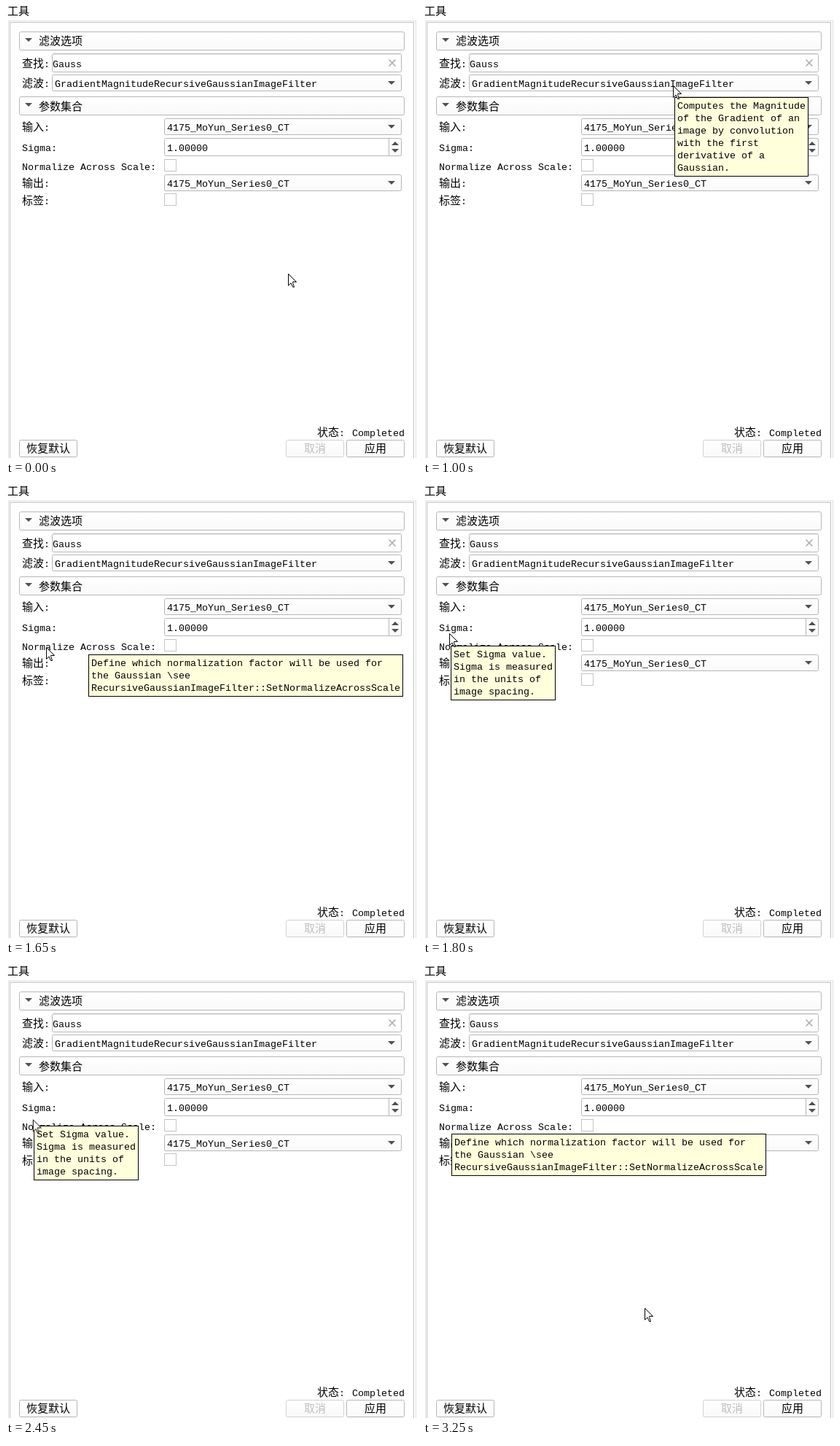
Write an HTML page that moves like this. It is 564 px wide and 620 px high and loops after 3.3 s.

```html
<!DOCTYPE html>
<html lang="zh-CN">
<head>
<meta charset="utf-8">
<title>工具</title>
<style>
  html, body { margin: 0; width: 100%; height: 100%; overflow: hidden; background: #fff; }
  svg { display: block; }
  text { font: 13.333px "Liberation Mono", "Noto Sans Mono", monospace; fill: #000; }
  .zh { font: 300 15px "Noto Sans CJK SC", "Noto Sans CJK", sans-serif; }
  .box { fill: #fff; stroke: #b6b6b6; }
  .face { fill: url(#face); stroke: #b6b6b6; }
  .off { stroke: #d2d2d2; }
  .check { fill: #fff; stroke: #c4c4c4; }
  .arrow { fill: #505050; }
  .dim { fill: #bebebe; }
  .paper { fill: #ffffdc; stroke: #000; }

  /* Start slightly early so each step has landed on its 50 ms tick. */
  .tip, #cursor { animation: 3300ms step-end -4ms infinite; }
  .tip { opacity: 0; }
  #tip1 { animation-name: tip1; }
  #tip2 { animation-name: tip2; }
  #tip3 { animation-name: tip3; }
  #tip4 { animation-name: tip4; }
  #cursor { animation-name: roam; }

  @keyframes tip1 { 0%, 48.4848% { opacity: 0; } 30.303% { opacity: 1; } }
  @keyframes tip2 { 0%, 53.0303% { opacity: 0; } 48.4848% { opacity: 1; } }
  @keyframes tip3 { 0%, 75.7576% { opacity: 0; } 53.0303% { opacity: 1; } }
  @keyframes tip4 { 0% { opacity: 0; } 75.7576%, 100% { opacity: 1; } }

  @keyframes roam {
    0%       { transform: translate(387px, 367px); animation-timing-function: steps(3, end); }
    4.5455%  { transform: translate(368px, 232px); animation-timing-function: steps(4, end); }
    10.6061% { transform: translate(347px, 112px); }
    15.1515% { transform: translate(345px, 110px); }
    16.6667% { transform: translate(343px, 109px); }
    43.9394% { transform: translate(343px, 109px); animation-timing-function: steps(3, end); }
    48.4848% { transform: translate(111px, 215px); }
    50%      { transform: translate(55px, 221px); animation-timing-function: steps(2, end); }
    53.0303% { transform: translate(36px, 203px); animation-timing-function: steps(2, end); }
    56.0606% { transform: translate(36px, 201px); }
    69.697%  { transform: translate(36px, 200px); animation-timing-function: steps(4, end); }
    75.7576% { transform: translate(37px, 214px); animation-timing-function: steps(2, end); }
    78.7879% { transform: translate(32px, 215px); }
    92.4242% { transform: translate(32px, 215px); animation-timing-function: steps(4, end); }
    98.4848%, 100% { transform: translate(304px, 469px); }
  }
</style>
</head>
<body>
<svg width="564" height="620" viewBox="0 0 564 620">
  <defs>
    <linearGradient id="face" x2="0" y2="1">
      <stop stop-color="#fff"/>
      <stop offset="1" stop-color="#f9f9f9"/>
    </linearGradient>
    <path id="down" class="arrow" d="M-5 -3H5L0 2Z"/>
    <g id="header">
      <rect class="face" x="18.5" y=".5" width="528" height="25" rx="2"/>
      <use href="#down" x="31" y="12"/>
    </g>
    <g id="combo">
      <rect class="face" x="217.5" y=".5" width="325" height="22" rx="2"/>
      <use href="#down" x="529" y="12"/>
      <text x="221" y="17">4175_MoYun_Series0_CT</text>
    </g>
    <rect id="check" class="check" x="217.5" y=".5" width="16" height="16"/>
    <g id="scaleTip">
      <rect class="paper" x=".5" y=".5" width="431" height="57"/>
      <text y="16">
        <tspan x="4">Define which normalization factor will be used for</tspan>
        <tspan x="4" dy="17">the Gaussian \see</tspan>
        <tspan x="4" dy="17">RecursiveGaussianImageFilter::SetNormalizeAcrossScale</tspan>
      </text>
    </g>
  </defs>

  <!-- Panel frame -->
  <text class="zh" x="2" y="12">工具</text>
  <rect x="3.5" y="20.5" width="559" height="620" fill="none" stroke="#dedede"/>
  <rect x="5.5" y="22.5" width="554" height="620" fill="none" stroke="#c2c2c2"/>

  <!-- Filter options -->
  <use href="#header" y="35"/>
  <text class="zh" x="45" y="53">滤波选项</text>
  <text x="22" y="84"><tspan class="zh">查找</tspan>:</text>
  <rect class="box" x="63.5" y="65.5" width="479" height="25" rx="2"/>
  <path d="M65 66.5H541" stroke="#e6e6e6"/>
  <text x="64" y="84">Gauss</text>
  <path d="M525.5 73.5l9 9m0 -9l-9 9" stroke="#acacac" stroke-width="1.6"/>
  <text x="22" y="111"><tspan class="zh">滤波</tspan>:</text>
  <rect class="face" x="63.5" y="94.5" width="479" height="22" rx="2"/>
  <use href="#down" x="529" y="106"/>
  <text x="67" y="111">GradientMagnitudeRecursiveGaussianImageFilter</text>

  <!-- Parameters -->
  <use href="#header" y="124"/>
  <text class="zh" x="45" y="143">参数集合</text>
  <text x="22" y="171"><tspan class="zh">输入</tspan>:</text>
  <use href="#combo" y="154"/>
  <text x="22" y="199">Sigma:</text>
  <rect class="box" x="217.5" y="181.5" width="325" height="24" rx="2"/>
  <path class="face" d="M525.5 181.5h15q2 0 2 2v20q0 2 -2 2h-15z"/>
  <use href="#down" transform="translate(534 188) scale(1 -1)"/>
  <use href="#down" x="534" y="199"/>
  <text x="221" y="199">1.00000</text>
  <text x="22" y="225">Normalize Across Scale:</text>
  <use href="#check" y="210"/>
  <text x="22" y="248"><tspan class="zh">输出</tspan>:</text>
  <use href="#combo" y="231"/>
  <text x="22" y="272"><tspan class="zh">标签</tspan>:</text>
  <use href="#check" y="257"/>

  <!-- Footer -->
  <text x="427" y="590"><tspan class="zh">状态</tspan>: <tspan x="475">Completed</tspan></text>
  <rect class="face" x="18.5" y="595.5" width="79" height="23" rx="2"/>
  <text class="zh" x="28" y="612">恢复默认</text>
  <rect class="face off" x="384.5" y="595.5" width="79" height="23" rx="2"/>
  <text class="zh dim" x="409" y="612">取消</text>
  <rect class="face" x="467.5" y="595.5" width="79" height="23" rx="2"/>
  <text class="zh" x="492" y="612">应用</text>

  <!-- Tooltips -->
  <g id="tip1" class="tip">
    <rect class="paper" x="345.5" y="125.5" width="183" height="108"/>
    <text y="141">
      <tspan x="349">Computes the Magnitude</tspan>
      <tspan x="349" dy="17">of the Gradient of an</tspan>
      <tspan x="349" dy="17">image by convolution</tspan>
      <tspan x="349" dy="17">with the first</tspan>
      <tspan x="349" dy="17">derivative of a</tspan>
      <tspan x="349" dy="17">Gaussian.</tspan>
    </text>
  </g>
  <g id="tip2" class="tip"><use href="#scaleTip" x="113" y="231"/></g>
  <g id="tip3" class="tip">
    <rect class="paper" x="38.5" y="219.5" width="143" height="74"/>
    <text y="235">
      <tspan x="42">Set Sigma value.</tspan>
      <tspan x="42" dy="17">Sigma is measured</tspan>
      <tspan x="42" dy="17">in the units of</tspan>
      <tspan x="42" dy="17">image spacing.</tspan>
    </text>
  </g>
  <g id="tip4" class="tip"><use href="#scaleTip" x="39" y="230"/></g>

  <path id="cursor" d="M.5 .5V16.5L4 13L6.500 18.500H8.500L6.500 12.500V11.500H11.500Z" fill="#fff" stroke="#000"/>
</svg>
</body>
</html>
```
